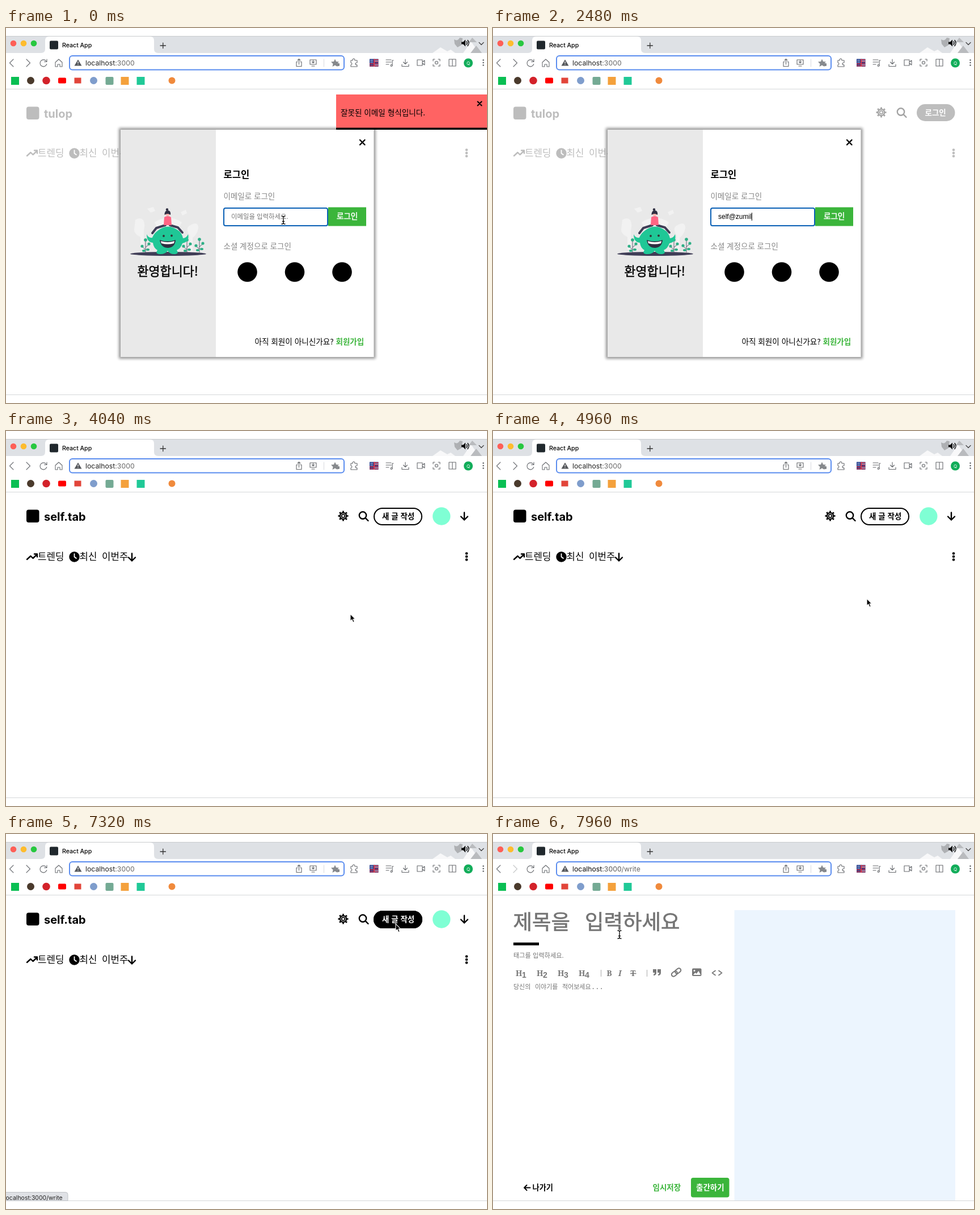
An HTML page that plays this animation: 848x660 px, repeating every 8 s.

```html
<!DOCTYPE html>
<html lang="ko">
<head>
<meta charset="utf-8">
<title>React App</title>
<style>
html,body{margin:0;width:100%;height:100%;overflow:hidden;background:#fff}
svg{display:block;width:848px;height:660px;font-family:'Noto Sans CJK KR','Noto Sans CJK',sans-serif;font-size:13.5px}
.i{font-family:Inter,sans-serif}
.b{font-weight:700}
.m{stroke:currentColor;stroke-width:.5px}
.l{fill:none;stroke:currentColor;stroke-width:1.3px;stroke-linecap:round;stroke-linejoin:round}
.thin{stroke-width:1.1px}
.t{stroke-width:2.4px}
.tab{font-size:16.8px}
.s,#cur{animation:8s step-end infinite}
.out{animation-name:out}
.home{animation-name:home}
.write{animation-name:write}
.before{animation-name:before}
.hover{animation-name:hover}
.status{animation-name:status}
.beam{animation-name:beam}
.hand{animation-name:hand}
.arrow{animation-name:arrow}
#cur{animation-name:move;animation-timing-function:ease-in-out}
.toast{animation:toast 8s ease infinite}
@keyframes out{0%{opacity:1}50%,to{opacity:0}}
@keyframes home{0%{opacity:0}50%{opacity:1}93%,to{opacity:0}}
@keyframes write{0%{opacity:0}93%,to{opacity:1}}
@keyframes before{0%{opacity:1}93%,to{opacity:.4}}
@keyframes hover{0%{opacity:0}90%{opacity:1}93%,to{opacity:0}}
@keyframes status{0%{opacity:0}90.5%{opacity:1}96.5%,to{opacity:0}}
@keyframes beam{0%{opacity:1}7.5%{opacity:0}41.5%{opacity:1}43.5%{opacity:0}97%,to{opacity:1}}
@keyframes hand{0%{opacity:0}43.5%{opacity:1}50%,to{opacity:0}}
@keyframes arrow{0%{opacity:0}50%{opacity:1}97%,to{opacity:0}}
@keyframes toast{
0%,7%{transform:none;opacity:1}
8.9%{transform:translateX(-18px);opacity:1}
16.4%,to{transform:translateX(1800px);opacity:0}}
@keyframes move{
0%,41.5%{transform:translate(489px,338px)}
44.5%,54%{transform:translate(607px,322px)}
62%{transform:translate(659px,295px)}
64%,65%{transform:translate(663px,297px)}
72%,74.5%{transform:translate(128px,160px)}
80.5%{transform:translate(80px,170px)}
84.5%,85%{transform:translate(104px,180px)}
90.5%,93%{transform:translate(687px,158px)}
95.5%{transform:translate(484px,170px)}
99.5%,to{transform:translate(223px,177px)}}
</style>
</head>
<body>
<svg viewBox="0 0 848 660" color="#000">
<defs>
  <filter id="soft" x="-5%" y="-5%" width="110%" height="110%"><feGaussianBlur stdDeviation="2.600"/></filter>
  <g id="gear">
    <circle r="7.600" pathLength="16" fill="none" stroke="currentColor" stroke-width="2.800" stroke-dasharray=".9 1.1" transform="rotate(-10)"/>
    <circle r="5.700" fill="none" stroke="currentColor" stroke-width="2.200"/>
    <circle r="2.900" fill="none" stroke="currentColor" stroke-width="1.800"/>
  </g>
  <g id="search" class="l t"><circle cx="-1.5" cy="-1.5" r="6.2"/><path d="M3.2 3.2 8 8"/></g>
  <path id="down" class="l t" d="M0-6.5V6.5M-6 .5 0 6.5 6 .5"/>
  <g id="tabs">
    <path class="l t" d="M37 226l6.500-6 4 4 7.500-7M50 216.500h5v5"/>
    <text class="tab" x="56" y="227.300">트렌딩</text>
    <circle cx="120.500" cy="221.500" r="9.200"/>
    <path d="M120.500 215.500v6l4 3" fill="none" stroke="#fff" stroke-width="1.800"/>
    <text class="tab" x="129.500" y="227.300">최신</text>
    <text class="tab" x="169" y="227.300">이번주</text>
    <circle cx="812" cy="215.500" r="2.300"/><circle cx="812" cy="221" r="2.300"/><circle cx="812" cy="226.500" r="2.300"/>
  </g>
  <g id="plant">
    <path d="M0 0V-22M0-6l-6-5M0-10l6-5" fill="none" stroke="#3f3d56" stroke-width=".8"/>
    <g fill="#2faf86"><circle cy="-23" r="2.800"/><circle cx="-6" cy="-12" r="2.600"/><circle cx="6" cy="-16" r="2.600"/><ellipse cx="-3" cy="-4" rx="3" ry="2"/><ellipse cx="4" cy="-6" rx="3" ry="2"/></g>
  </g>
</defs>

<rect width="848" height="660" fill="#fff"/>

<!-- browser window -->
<rect y="14" width="848" height="30" fill="#dee1e5"/>
<path d="M0 14.500H848" stroke="#c9cbce"/>
<path d="M752 44l14-10 12 7 6-3 8 6zM806 44l14-20 14 20z" fill="#f8f8f9"/>
<path d="M819 44l10-13 10 13zM822 17l8 8h-14z" fill="#b9bbbe"/>
<path d="M790 20q6 4 10-3l5 1-2 12-7 4-5-6z" fill="#aeb0b3"/>
<path d="M803 24.500h3l4-4v12l-4-4h-3z"/>
<path class="l" d="M812 23.500q2 3 0 6M814 21.500q4 5 0 10"/>
<path class="l" d="M834 25.500l4 4 4-4" color="#444"/>
<circle cx="13" cy="27" r="5.300" fill="#fe5f57"/><circle cx="31" cy="27" r="5.300" fill="#febc2e"/><circle cx="49" cy="27" r="5.300" fill="#28c840"/>
<path d="M62 44q7 0 7-7V22q0-7 7-7H254q7 0 7 7v15q0 7 7 7z" fill="#fff"/>
<rect x="77" y="22.500" width="15" height="15" rx="2" fill="#20282d"/>
<text class="i" x="99" y="34" font-size="10.600" font-weight="500">React App</text>
<path class="l" d="M272 31h9.500M276.800 26.200v9.500" color="#333"/>

<g class="l thin" color="#6b6e72">
  <path d="M13 55l-6.500 6.500L13 68"/>
  <path class="s before" d="M36 55l6.500 6.500L36 68"/>
  <path d="M71 58.500a6 6 0 1 0 .8 5M72 55v4.500h-4.500"/>
  <path d="M87 60.500l6-5.500 6 5.500V68H95v-4h-4v4h-4z"/>
</g>
<rect x="112" y="49" width="484" height="24.500" rx="5" fill="#fff" stroke="#5b8def" stroke-width="2"/>
<path d="M127 55.500l6.500 11h-13z" fill="#55585c"/>
<path d="M127 59v3.500M127 64v1" stroke="#fff" stroke-width="1.200"/>
<g class="i" font-size="12.250" fill="#222">
  <text class="s before" x="140" y="66">localhost<tspan fill="#666">:3000</tspan></text>
  <text class="s write" x="140" y="66">localhost<tspan fill="#666">:3000/write</tspan></text>
</g>
<g class="l thin" color="#66696d">
  <path d="M514 59.500h-2v8h9v-8h-2M516.500 64v-9M514 57l2.500-2.500L519 57"/>
  <path d="M536 56h11v8h-11zM539 67h5M541.500 57v4M539.500 59.500l2 2 2-2"/>
  <path d="M560.500 55v13" color="#dadce0"/>
  <path d="M608 57h3q0-3 2-3t2 3h4v4q-3 0-3 2t3 2v3h-11v-3q2-.5 2-2t-2-2z"/>
  <path d="M670 56h9M670 60h9M670 64h5M681 66v-9h2"/><circle cx="679.500" cy="66" r="1.500"/>
  <path d="M704 55v8M700.500 60l3.500 3.500 3.500-3.500M698 64v3.500h12V64"/>
  <path d="M725 56h9v10h-9zM734 60l4-3v8l-4-3"/>
  <path d="M753 58v-3h3M762 55h3v3M765 64v3h-3M756 67h-3v-3"/><circle cx="759" cy="61" r="2.500"/>
  <path d="M781 55h12v12h-12zM787 55v12"/>
</g>
<path d="M580 54.500l2 4.500 5 .5-3.500 3.500 1 5-4.500-2.500-4.500 2.500 1-5-3.500-3.500 5-.5z" fill="#86898d"/>
<rect x="582" y="62" width="6" height="5" rx="1" fill="#86898d"/>
<rect x="641" y="54.500" width="15.500" height="13.500" fill="#1f3a8a"/>
<path d="M649 56h7.500M649 59.500h7.500M641 63h15.500M641 66.500h15.500M649 54.500V68" stroke="#e33a48" stroke-width="1.700"/>
<path d="M642 57h5M642 60h5M650 58h6M650 65h6" stroke="#fff" stroke-width=".8"/>
<circle cx="815" cy="61.500" r="8" fill="#12ad5a"/>
<text class="i" x="815" y="64.500" font-size="8" fill="#fff" text-anchor="middle">Q</text>
<g fill="#55585c"><circle cx="841.500" cy="56.500" r="1.200"/><circle cx="841.500" cy="61" r="1.200"/><circle cx="841.500" cy="65.500" r="1.200"/></g>

<rect x="9" y="86" width="14" height="14" fill="#0abf53"/>
<circle cx="43.500" cy="92.500" r="6.500" fill="#4a3a2c"/>
<circle cx="71" cy="92.500" r="6.800" fill="#d3222a"/>
<rect x="92" y="87.500" width="14" height="10" rx="2" fill="#f00"/>
<rect x="120.500" y="87.500" width="12" height="10" fill="#e2453a"/>
<circle cx="154.500" cy="92.500" r="6.500" fill="#7f9dcc"/>
<rect x="175.500" y="86" width="14" height="14" rx="2" fill="#74aa94"/>
<rect x="202.500" y="86" width="14" height="14" fill="#f4a13c"/>
<rect x="230.500" y="86" width="14" height="14" fill="#20c997"/>
<circle cx="292.500" cy="92.500" r="6" fill="#f08a3c"/>
<path d="M0 107.500H848M0 645.500H848" stroke="#d6d7d9"/>

<!-- signed out, dimmed behind the login box -->
<g class="s out">
  <g opacity=".26">
    <rect x="36" y="138.500" width="22.500" height="22.500" rx="4"/>
    <text class="i b" x="67" y="157.500" font-size="20">tulop</text>
    <use href="#tabs" y="-1"/>
  </g>
  <use href="#gear" x="684.500" y="148.500" color="#a3a3a3"/>
  <use href="#search" x="720.500" y="149" color="#a3a3a3"/>
  <rect x="747" y="134" width="67.500" height="30" rx="15" fill="#bdbdbd"/>
  <text class="b" x="761.500" y="153.500" fill="#fff">로그인</text>

  <rect x="199" y="176" width="452.500" height="406" fill="#000" opacity=".42" filter="url(#soft)"/>
  <rect x="202" y="179" width="446.500" height="400" fill="#fff"/>
  <rect x="202" y="179" width="168" height="400" fill="#e9e9e9"/>

  <g fill="#f2f2f2">
    <path d="M228 338q8-6 14 0 4 8 1 18v34h-6v-22q-12-6-11-14zM327 346q12-6 12 6-2 12-10 17v26h-5v-30q-10-14 3-19zM249 318l11-3 3 7-8 3zM308 324l9-4 2 6-8 4z"/>
    <path d="M262 342q24-16 48 0l-6 12h-36z"/>
  </g>
  <ellipse cx="286" cy="397.500" rx="67" ry="3.500" fill="#3f3d56"/>
  <use href="#plant" x="246" y="396"/><use href="#plant" x="319" y="396"/><use href="#plant" x="341" y="395"/>
  <path d="M266 358Q285 341 306 358 311 364 312 370 318 370 321 363 324 376 311 379 308 388 301 391 306 398 296 398 289 398 285 392 281 398 272 398 262 398 267 391 260 387 259 378 248 377 248 363 251 370 258 369 260 363 266 358z" fill="#1fc796"/>
  <circle cx="278" cy="366" r="1.900" fill="#333"/><circle cx="292" cy="365.500" r="1.900" fill="#333"/>
  <path d="M271 373q14 5 28 0-1 13-13 14-13 0-15-14z" fill="#2f2e41"/>
  <path d="M273 375q12 4 24 0l-1 4q-11 3-22 0z" fill="#fff"/>
  <path d="M281 347l-16 5-7 9M289 347l14 4 8 9" fill="none" stroke="#3f3d56" stroke-width="4" stroke-linecap="round"/>
  <path d="M279 333q6-4 12 0l1 14h-14z" fill="#ff6584"/>
  <circle cx="285" cy="327" r="3.700" fill="#f8b6b0"/>
  <path d="M279.500 329q0-8 5.500-8 6 0 5 8-5-4-10.500 0z" fill="#2f2e41"/><circle cx="284" cy="319.500" r="2.200" fill="#2f2e41"/>
  <text class="m" x="231.500" y="436" font-size="21.800">환영합니다!</text>

  <path class="l t" d="M624 197l8.500 8.500M632.500 197l-8.500 8.500"/>
  <text class="b" x="383.500" y="264.300" font-size="16.600">로그인</text>
  <g fill="#868686">
    <text x="383.500" y="300.800">이메일로 로그인</text>
    <text x="383.500" y="389">소셜 계정으로 로그인</text>
  </g>
  <rect x="568" y="315.500" width="67" height="33" fill="#3bb53b"/>
  <rect x="384" y="317" width="183" height="31" rx="3" fill="#fff" stroke="#0a60b5" stroke-width="2"/>
  <text id="hint" x="397" y="335.800" font-size="11.400" fill="#757575">이메일을 입력하세요.</text>
  <text id="mail" x="397" y="336" font-size="12" font-family="'Liberation Sans',Arial,sans-serif"></text>
  <rect id="caret" y="325" width="1" height="14"/>
  <text class="m" x="583" y="336.300" fill="#fff" color="#fff">로그인</text>
  <circle cx="425.500" cy="429.500" r="17.300"/><circle cx="509" cy="429.500" r="17.300"/><circle cx="592.500" cy="429.500" r="17.300"/>
  <text x="438.500" y="557" font-size="13.600">아직 회원이 아니신가요?</text>
  <text class="b" x="581.500" y="557" fill="#3bb53b">회원가입</text>

  <g class="toast">
    <rect x="582" y="117" width="290" height="62" fill="#ff6363"/>
    <rect x="582" y="175.500" width="290" height="3.500"/>
    <text x="590" y="153.800" font-size="13.600">잘못된 이메일 형식입니다.</text>
    <path class="l" d="M831.500 129.500l7 7M838.500 129.500l-7 7" style="stroke-width:2px"/>
  </g>
</g>

<!-- signed in -->
<g class="s home">
  <rect x="36" y="138.500" width="22.500" height="22.500" rx="4"/>
  <text class="i b" x="67" y="158" font-size="20">self.tab</text>
  <use href="#tabs"/>
  <use href="#down" x="222" y="222"/>
  <use href="#gear" x="594.500" y="149.500"/>
  <use href="#search" x="630.500" y="150"/>
  <rect x="649" y="136" width="84" height="29" rx="14.500" fill="#fff" stroke="#000" stroke-width="2"/>
  <text class="b" x="663" y="154.800">새 글 작성</text>
  <g class="s hover">
    <rect x="648" y="135" width="86" height="31" rx="15.500"/>
    <text class="b" x="663" y="154.800" fill="#fff">새 글 작성</text>
  </g>
  <circle cx="767.800" cy="150" r="15.700" fill="#7fffd4"/>
  <use href="#down" x="808" y="150"/>
</g>

<!-- editor -->
<g class="s write">
  <rect x="425.500" y="134" width="389.500" height="511" fill="#ecf5fe"/>
  <g font-size="36.400" fill="#757575" color="#757575" stroke="currentColor" stroke-width=".7">
    <text x="35.500" y="168">제목을</text><text x="162" y="168">입력하세요</text>
  </g>
  <rect x="36" y="191" width="45" height="5"/>
  <g fill="#757575" font-size="11">
    <text x="36" y="218.200" font-size="11.200">태그를 입력하세요.</text>
    <text x="36" y="273">당신의</text><text x="74" y="273">이야기를</text><text x="122" y="273">적어보세요</text>
    <text x="173" y="273" font-size="12" font-family="'Liberation Mono',monospace">...</text>
  </g>
  <g id="tools" fill="#777" color="#777">
    <path d="M190.500 239v12M271.500 239v12" stroke="#aaa"/>
    <g class="b" font-family="'Noto Serif',serif" font-size="13.500">
      <text x="200.500" y="249.500">B</text><text x="221" y="249.500" font-style="italic">I</text><text x="242.500" y="249.500">T</text>
    </g>
    <path d="M242 245.500h10.500" stroke="#777" stroke-width="1.500"/>
    <path d="M282 238h6v6q0 5-5 5v-2q2 0 2-3h-3zM290 238h6v6q0 5-5 5v-2q2 0 2-3h-3z"/>
    <g class="l" style="stroke-width:2px" transform="rotate(-38 323 243.500)"><rect x="313.500" y="240" width="11" height="7" rx="3.500"/><rect x="321.500" y="240" width="11" height="7" rx="3.500"/></g>
    <rect x="351" y="236.500" width="16.500" height="13.500" rx="2"/>
    <circle cx="355" cy="240.500" r="1.500" fill="#fff"/><path d="M353 248l3.500-4 2 2 4-5 3.500 7z" fill="#fff"/>
    <path class="l" style="stroke-width:1.700px" d="M392 240.500l-5.500 4 5.500 4M398 240.500l5.500 4-5.500 4"/>
  </g>
  <path class="l" style="stroke-width:2px" d="M55 622.500h10.500M59.500 618l-4.500 4.500 4.500 4.500"/>
  <text class="b" x="69.500" y="627.200" font-size="13.200">나가기</text>
  <text class="b" x="281.500" y="627.200" fill="#3bb53b">임시저장</text>
  <rect x="349" y="605" width="67.500" height="34.500" rx="4" fill="#3bb53b"/>
  <text class="b" x="358" y="627.200" fill="#fff">출간하기</text>
</g>

<g class="s status">
  <path d="M-2 630.500H105q4 0 4 4V645.500H-2z" fill="#dfe1e5" stroke="#bfc2c6"/>
  <text class="i" x="-3" y="643.500" font-size="10.500" fill="#222">localhost:3000/write</text>
</g>

<g id="cur">
  <g class="s beam l">
    <path d="M-3-7q3 0 3 2V5q0 2-3 2M3-7q-3 0-3 2M3 7q-3 0-3-2M-1.500 2.500h3" stroke="#fff" stroke-width="3"/>
    <path d="M-3-7q3 0 3 2V5q0 2-3 2M3-7q-3 0-3 2M3 7q-3 0-3-2M-1.500 2.500h3"/>
  </g>
  <path class="s hand" d="M-1 1q1-2 2.500 0l2 4.500q1-1.500 2.500-.2 1.400-1 2.400.3 1.800-.6 2 1.400l.3 4-1.700 4H3L-2.500 9.500q-.5-2 1.500-1.500l1.500 1z" fill="#fff" stroke="#000"/>
  <path class="s arrow" d="M0 0V12.500l2.900-2.600 2 4.800 2.300-1-2-4.600h3.700z" stroke="#fff" stroke-width="1.100"/>
</g>
</svg>
<script>
const ns = 'http://www.w3.org/2000/svg';
const [hint, mail, caret, tools] = ['hint', 'mail', 'caret', 'tools'].map(id => document.getElementById(id));
const address = 'self@zumil.com';
const keys = [800, 900, 1000, 1120, 1480, 1640, 1800, 2000, 2080, 2320, 2680, 2800, 2920, 3040];

function label(x, y, text, family) {
  const el = document.createElementNS(ns, 'text');
  const attrs = {x, y, 'font-family': family, 'font-size': 14, 'font-weight': 700};
  for (const name in attrs) el.setAttribute(name, attrs[name]);
  el.textContent = text;
  tools.append(el);
}
for (let n = 1; n <= 4; n++) {
  const x = 3 + 37 * n;
  label(x, 249.5, 'H', "'Noto Serif',serif");
  label(x + 11, 252.5, n, "'Liberation Sans',sans-serif");
}

function draw(now) {
  const t = now % 8000;
  const count = keys.filter(k => k <= t).length;
  const typed = address.slice(0, count);
  if (mail.textContent !== typed) mail.textContent = typed;
  hint.style.opacity = count ? 0 : 1;
  caret.style.opacity = count && t < 3280 ? 1 : 0;
  caret.setAttribute('x', 397 + (count ? mail.getComputedTextLength() : 0));
  requestAnimationFrame(draw);
}
requestAnimationFrame(draw);
</script>
</body>
</html>
```
